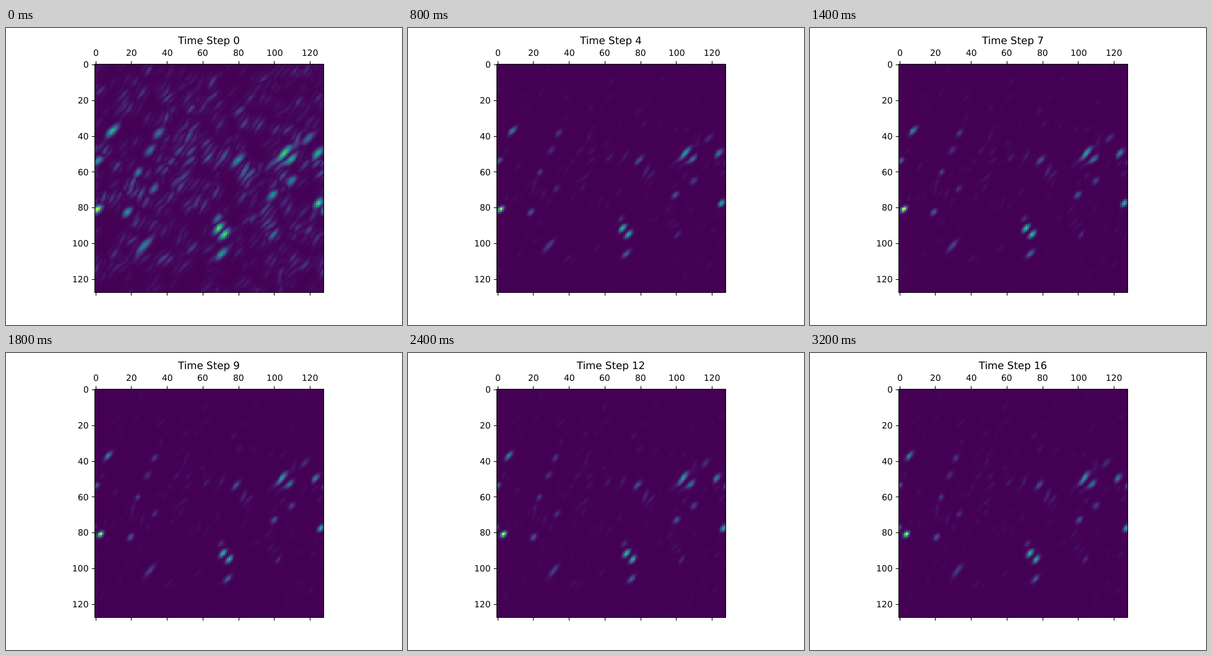
An HTML page with a canvas for the animation above (3.4 s loop, 640 px wide and 480 px high).

```html
<!DOCTYPE html>
<html lang="en">
<head>
<meta charset="utf-8">
<title>Time Step</title>
<style>
  html, body { margin: 0; width: 100%; height: 100%; overflow: hidden; background: #fff; }
  #stage { position: absolute; left: 0; top: 0; width: 640px; height: 480px; }
  canvas { position: absolute; left: 143px; top: 58px; }
  svg { position: absolute; left: 0; top: 0; }
  text { font: 13.89px "DejaVu Sans", sans-serif; fill: #000; text-rendering: geometricPrecision; }
  #title { font-size: 16.67px; }
</style>
</head>
<body>
<div id="stage">
  <canvas id="map" width="371" height="370"></canvas>
  <svg id="axes" width="640" height="480" viewBox="0 0 640 480">
    <rect x="143.5" y="58.5" width="370" height="369" fill="none" stroke="#000" stroke-width="1.1"/>
    <text id="title" x="328" y="26" text-anchor="middle">Time Step 0</text>
  </svg>
</div>
<script>
const N = 128, CELL = 369.6 / N, LEFT = 143.2, TOP = 57.6;
const STEP_MS = 200, STEPS = 17, LAST_MOVE = 15;
const canvas = document.getElementById('map');
const ctx = canvas.getContext('2d');
const title = document.getElementById('title');
const axes = document.getElementById('axes');

// The brightest crests: x, y, signed height, half length
const CRESTS = [
  [1.2, 81, 1, 1.9], [1.5, 53.7, .55, 2], [9.5, 37.1, .66, 2.8], [17.9, 82.7, .52, 2],
  [24, 60.2, .42, 1.8], [27.4, 101.3, .44, 4.1], [32.7, 69.6, .35, 2.4], [35.4, 38.4, .4, 2.3],
  [30.6, 48, .36, 2.4], [69, 91.7, .82, 2.4], [72.1, 95, -.8, 2.4], [68.4, 86.2, -.35, 2.2],
  [70.5, 106, .55, 2.7], [79.7, 53.6, .5, 3], [105.8, 49.5, .74, 3.9], [109.5, 53, -.6, 2.8],
  [99.2, 73, .5, 2.2], [109.6, 65.2, .43, 2.4], [124.5, 49.6, .64, 2.5], [119.2, 41, .36, 3.2],
  [124.9, 77.5, .78, 2]
];

function seeded(s) {
  return () => {
    s = s + 0x6D2B79F5 | 0;
    let r = Math.imul(s ^ s >>> 15, 1 | s);
    r = r + Math.imul(r ^ r >>> 7, 61 | r) ^ r;
    return ((r ^ r >>> 14) >>> 0) / 4294967296;
  };
}

function ripple(x, y, h, len, wid = 1.15, deg = 47, wave = 0) {
  const a = deg * Math.PI / 180;
  return { x, y, h, len, wid, wave, c: Math.cos(a), s: Math.sin(a), r: Math.ceil(2.8 * len) };
}

// Faint ripples fill the space between the crests, weaker near top and bottom
const rnd = seeded(41);
const ripples = CRESTS.map(c => ripple(...c));
for (let i = 0; i < 440; i++) {
  const x = rnd() * N, y = rnd() * N, sign = rnd() < .5 ? -1 : 1;
  const h = (.06 + .22 * rnd() ** 4) * (.5 + .5 * Math.sin(Math.PI * y / N));
  const len = 2 + 1.2 * rnd(), deg = 38 + 28 * rnd();
  if (CRESTS.some(c => Math.hypot(c[0] - x, c[1] - y) < 5)) continue;
  ripples.push(ripple(x, y, sign * h, len, 1.8, deg, .95));
}

// Sideways drift of a row, in cells per step
const drift = y => -.43 * Math.cos(Math.PI * y / N);

function field(step) {
  const f = new Float32Array(N * N);
  for (const b of ripples) {
    const y0 = Math.max(0, Math.floor(b.y - b.r)), y1 = Math.min(N - 1, Math.ceil(b.y + b.r));
    for (let y = y0; y <= y1; y++) {
      const cx = b.x + drift(y) * step, dy = y - b.y;
      for (let x = Math.floor(cx - b.r); x <= cx + b.r; x++) {
        const dx = x - cx;
        const u = (dx * b.c - dy * b.s) / b.len, v = dx * b.s + dy * b.c;
        const bump = Math.exp(-.5 * (u * u + v * v / (b.wid * b.wid)));
        f[y * N + (x + N) % N] += b.h * bump * Math.cos(b.wave * v);
      }
    }
  }
  // The first step shows magnitude, later ones its square
  const level = f.map(v => step ? v * v : Math.abs(v));
  const max = level.reduce((a, b) => Math.max(a, b));
  return level.map(v => v / max);
}

const STOPS = ['440154', '472d7b', '3b528b', '2c728e', '21918c', '28ae80', '5ec962', 'addc30', 'fde725']
  .map(h => [0, 2, 4].map(i => parseInt(h.slice(i, i + 2), 16)));

function colour(level) {
  const p = level * 8, k = Math.min(7, Math.floor(p));
  return STOPS[k].map((v, c) => v + (STOPS[k + 1][c] - v) * (p - k));
}

// Grid cell under the centre of a screen pixel
const cellAt = (px, edge) => Math.max(0, Math.min(N - 1, Math.floor((px + .5 - edge) / CELL)));

function render(step) {
  const colours = Array.from(field(step), colour);
  const img = ctx.createImageData(canvas.width, canvas.height);
  let o = 0;
  for (let y = 0; y < canvas.height; y++) {
    const row = cellAt(y + 58, TOP) * N;
    for (let x = 0; x < canvas.width; x++, o += 4) {
      img.data.set(colours[row + cellAt(x + 143, LEFT)], o);
      img.data[o + 3] = 255;
    }
  }
  return img;
}

function add(tag, attrs, label = '') {
  const el = document.createElementNS('http://www.w3.org/2000/svg', tag);
  for (const k in attrs) el.setAttribute(k, attrs[k]);
  el.textContent = label;
  axes.appendChild(el);
}

const DIGIT = 8.84;
const snap = v => Math.floor(v + .5) + .5;
for (let v = 0; v <= 120; v += 20) {
  const x = LEFT + (v + .5) * CELL, y = TOP + (v + .5) * CELL;
  const w = DIGIT * String(v).length;
  add('path', {
    d: `M${snap(x)} 58.5v-4.9M${snap(x)} 427.5v4.9M143.5 ${snap(y)}h-4.9`,
    stroke: '#000', 'stroke-width': 1.1
  });
  add('text', { x: Math.round(x + .4 - w / 2), y: 45 }, v);
  add('text', { x: Math.round(133.5 - w), y: Math.round(y + 5.27) }, v);
}

const frames = Array.from({ length: LAST_MOVE + 1 }, (_, i) => render(i));
let shown = -1;

function show(ms) {
  const step = Math.floor(ms / STEP_MS) % STEPS;
  if (step === shown) return;
  shown = step;
  ctx.putImageData(frames[Math.min(step, LAST_MOVE)], 0, 0);
  title.textContent = 'Time Step ' + step;
}

const start = performance.now();
function tick() {
  show(performance.now() - start);
  requestAnimationFrame(tick);
}
tick();
</script>
</body>
</html>
```
